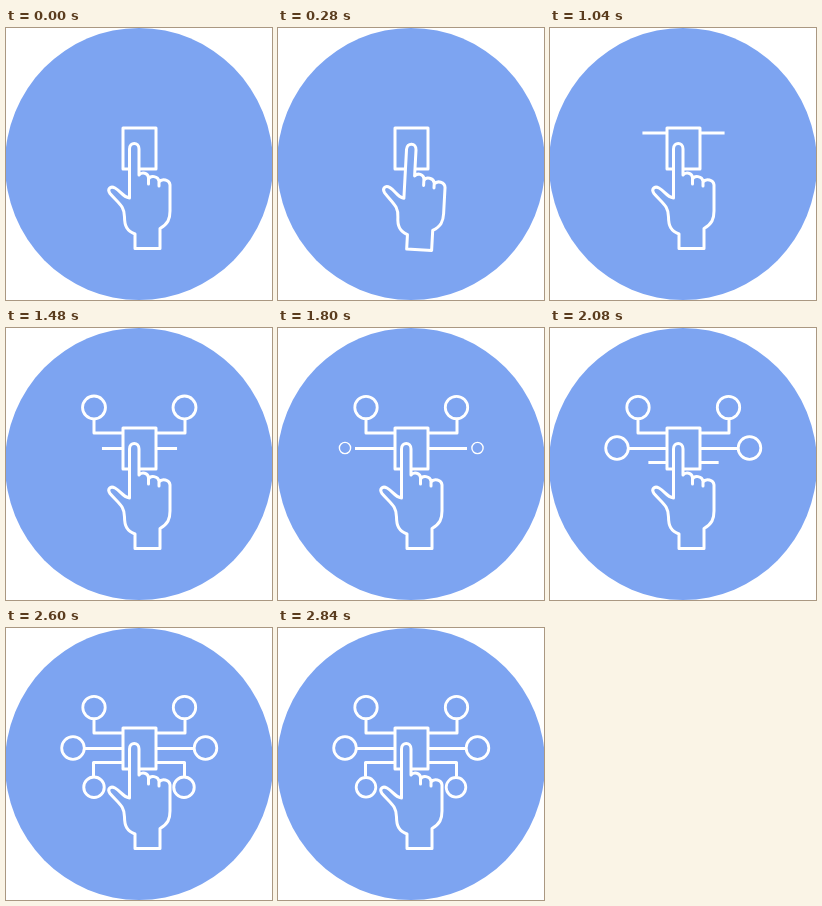
An HTML page for the animation above (2.88 s loop, 266 px wide and 272 px high).

```html
<!DOCTYPE html>
<html lang="en">
<head>
<meta charset="utf-8">
<title>Touch</title>
<style>
html, body { margin: 0; width: 100%; height: 100%; overflow: hidden; background: #fff; }
svg { display: block; width: 100vw; height: 100vh; }
.ink { fill: none; stroke: #fff; stroke-width: 3; stroke-linejoin: round; }
.solid { fill: #7da5ef; }
</style>
</head>
<body>
<svg viewBox="0 0 266 272">
  <ellipse cx="133" cy="136" rx="134" ry="136" fill="#7da4f1"/>
  <g id="net" class="ink"></g>
  <rect class="ink solid" x="117" y="100" width="33" height="41"/>
  <path id="hand" class="ink solid" stroke-linecap="round" d="M123.5 170V121
    C123.5 113.7 133 113.7 133 121V147
    C136 143.5 142 145 142.5 149.5V156V151
    C144.500 147 152 148 153 153V158V154
    C156 150 163.500 151.500 164 157V183
    C164 191 162 196 154 200.500V206V220.500H129V206
    C121 203 118.500 198 118.500 189
    C118.500 178 113 176 104 165.500
    C101 161.500 104 157.500 109 160
    C115 163 116 168.500 123.500 170"/>
</svg>
<script>
const LOOP = 2880, STEP = 40;
const net = document.getElementById('net');
const hand = document.getElementById('hand');

const clamp = v => Math.min(1, Math.max(0, v));
const span = (t, from, to) => clamp((t - from) / (to - from));
const linear = p => p;
const soft = p => p * (1.45 - 0.45 * p);
const back = p => 1 + 2.2 * (p - 1) ** 3 + 1.2 * (p - 1) ** 2;

function add(tag, attrs) {
  const el = document.createElementNS('http://www.w3.org/2000/svg', tag);
  for (const key in attrs) el.setAttribute(key, attrs[key]);
  net.appendChild(el);
  return el;
}

// Each branch: wire from the square, then a ring at its end.
const branches = [
  { left: 'M117 105H88V91', right: 'M150 105H179V91', len: 43,
    wire: [720, 1280], ease: linear, x: [88, 178.5], y: 79.5, r: 11.2, ring: [1280, 1520] },
  { left: 'M117 120.500H77', right: 'M150 120.500H189', len: 40,
    wire: [1280, 1760], ease: soft, x: [67, 199.5], y: 120, r: 11.3, ring: [1760, 2040] },
  { left: 'M117 134.500H87.500V148.500', right: 'M150 134.500H178.500V148.500', len: 43.5,
    wire: [1840, 2400], ease: linear, x: [88, 178], y: 159.3, r: 9.8, ring: [2400, 2760] }
];

for (const b of branches) {
  b.wires = [b.left, b.right].map(d => add('path', { d }));
  b.rings = b.x.map(cx => add('circle', { cx, cy: b.y, 'stroke-width': 2.8 }));
}

function draw(t) {
  const press = (1 - Math.cos(2 * Math.PI * span(t, 0, 480))) / 2;
  hand.setAttribute('transform',
    `translate(0 ${1.3 * press}) rotate(${3.3 * press} 141 214)`);

  for (const b of branches) {
    const grown = b.len * b.ease(span(t, ...b.wire));
    for (const w of b.wires) {
      w.setAttribute('stroke-dasharray', `${grown} 200`);
      w.style.display = grown > 0 ? '' : 'none';
    }
    const p = span(t, ...b.ring);
    const size = Math.max(0, back(p));
    for (const c of b.rings) {
      c.setAttribute('transform',
        `translate(${c.getAttribute('cx')} ${b.y}) scale(${size}) translate(${-c.getAttribute('cx')} ${-b.y})`);
      c.setAttribute('r', b.r);
      c.style.display = p > 0 ? '' : 'none';
    }
  }
}

const start = performance.now();
function tick() {
  const t = (performance.now() - start) % LOOP;
  draw(Math.floor(t / STEP) * STEP);
  requestAnimationFrame(tick);
}
draw(0);
requestAnimationFrame(tick);
</script>
</body>
</html>
```
